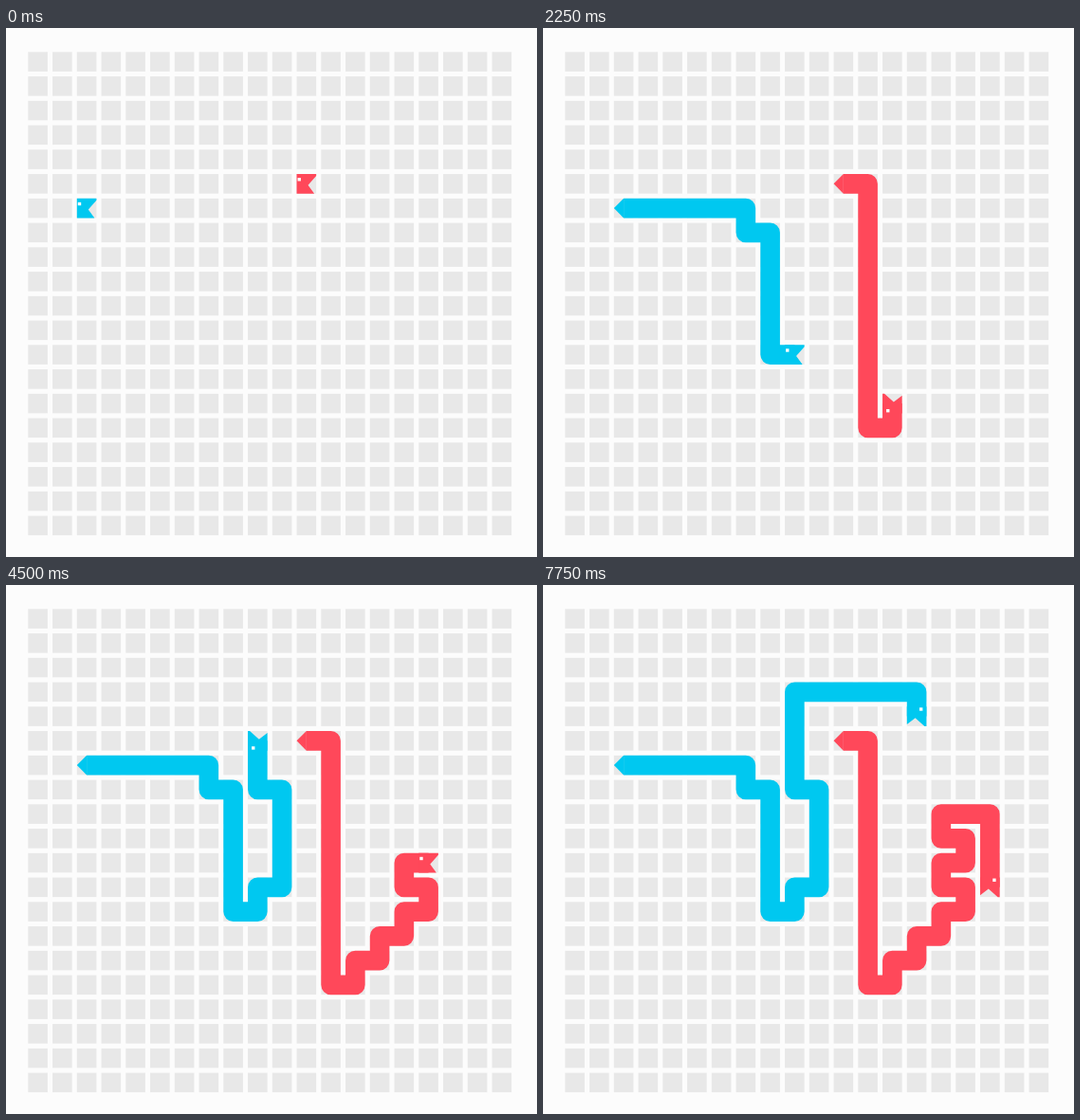
These frames come from a looping animation (560x558 px, 8000 ms). An HTML page with a canvas:

```html
<!DOCTYPE html>
<html>
<head>
<meta charset="utf-8">
<title>Snakes</title>
<style>
html, body { margin: 0; width: 100%; height: 100%; overflow: hidden; background: #fcfcfc; }
canvas { display: block; }
</style>
</head>
<body>
<canvas width="560" height="558"></canvas>
<script>
const ctx = document.querySelector('canvas').getContext('2d');
const LOOP = 8000, TICK = 250;
const PITCH = 25.75, CELL = 20.6, HALF = CELL / 2, LEFT = 23.3, TOP = 25.3;
const DIRS = { R: [1, 0], D: [0, 1], L: [-1, 0], U: [0, -1] };

// Moves made at each tick; summed into the total number of moves so far.
let total = 0;
const moves = [...'00131212121012101120010110101111'].map(n => total += +n);

const snakes = [
  { color: '#00c8f0', start: [2, 6], path: 'RRRRRDRDDDDDRURUUUULUUUURRRRRD' },
  { color: '#ff485a', start: [11, 5], path: 'RDDDDDDDDDDRURURURULURULURRDDD' }
];

const center = ([col, row]) => [LEFT + col * PITCH + HALF, TOP + row * PITCH + HALF];

function polygon(points) {
  ctx.beginPath();
  points.forEach(p => ctx.lineTo(...p));
  ctx.fill();
}

function drawGrid() {
  ctx.fillStyle = '#fcfcfc';
  ctx.fillRect(0, 0, 560, 558);
  ctx.fillStyle = '#e8e8e8';
  for (let col = 0; col < 20; col++)
    for (let row = 0; row < 20; row++)
      ctx.fillRect(LEFT + col * PITCH, TOP + row * PITCH, CELL, CELL);
}

function drawBody(cells) {
  const [x, y] = center(cells[0]);
  polygon([[x - HALF, y], [x, y - HALF], [x, y + HALF]]);
  ctx.lineWidth = CELL;
  ctx.lineJoin = 'round';
  ctx.beginPath();
  cells.forEach(cell => ctx.lineTo(...center(cell)));
  ctx.stroke();
}

function drawHead(cell, [dx, dy]) {
  ctx.save();
  ctx.translate(...center(cell));
  // Turn for up and down, mirror for left.
  if (dy) ctx.rotate(dy * Math.PI / 2);
  else ctx.scale(dx, 1);
  ctx.translate(-HALF, -HALF);
  polygon([[0, 0], [CELL, 0], [CELL, 2], [12, 11.8], [18.6, CELL], [0, CELL]]);
  ctx.fillStyle = '#fcfcfc';
  ctx.fillRect(1, 4, 3.4, 3.4);
  ctx.restore();
}

function drawSnake({ color, start, path }, count) {
  const cells = [start];
  for (const move of path.slice(0, count)) {
    const [col, row] = cells.at(-1), [dx, dy] = DIRS[move];
    cells.push([col + dx, row + dy]);
  }
  ctx.fillStyle = ctx.strokeStyle = color;
  if (count) drawBody(cells);
  drawHead(cells.at(-1), DIRS[path[Math.max(count - 1, 0)]]);
}

function frame() {
  const count = moves[Math.floor(performance.now() % LOOP / TICK)];
  drawGrid();
  snakes.forEach(snake => drawSnake(snake, count));
  requestAnimationFrame(frame);
}
frame();
</script>
</body>
</html>
```
